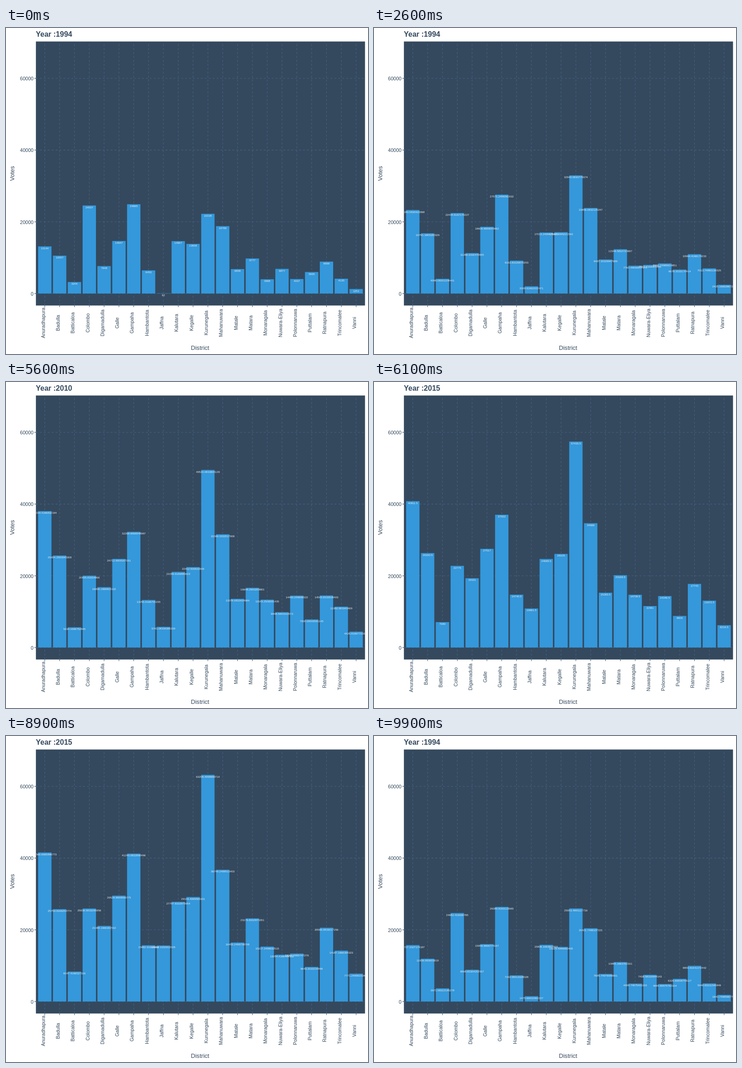
Recreate the animation shown at these times as an HTML page with a canvas. Size 789x710 px, loop 10 s.

```html
<!DOCTYPE html>
<html lang="en">
<head>
<meta charset="utf-8">
<title>Votes by district</title>
<style>
  html, body { margin: 0; width: 100%; height: 100%; overflow: hidden; background: #fff; }
  canvas { display: block; }
</style>
</head>
<body>
<canvas id="chart" width="789" height="710"></canvas>
<script>
const ctx = document.getElementById('chart').getContext('2d');
const SLATE = '#34495e', GRID = '#46627f', BLUE = '#3498db', PALE = '#ecf0f1';
const FONT = '"Liberation Sans", Arial, sans-serif';
const YEARS = [1994, 2010, 2015];
const DISTRICTS = [
  ['Anuradhapura', 13144, 37479, 44144],
  ['Badulla', 10557, 25519, 27142],
  ['Batticaloa', 3204, 5345, 8815],
  ['Colombo', 24557, 19488, 26062],
  ['Digamadulla', 7648, 16332, 22310],
  ['Galle', 14647, 24151, 30883],
  ['Gampaha', 24895, 31318, 42726],
  ['Hambantota', 6453, 12959, 16522],
  ['Jaffna', 62, 4737, 17026],
  ['Kalutara', 14607, 20382, 28997],
  ['Kegalle', 13838, 21674, 30536],
  ['Kurunegala', 22228, 47937, 66934],
  ['Mahanuwara', 18789, 30950, 38382],
  ['Matale', 6809, 13237, 17330],
  ['Matara', 9777, 15944, 24395],
  ['Monaragala', 3968, 13070, 16349],
  ['Nuwara-Eliya', 6877, 9506, 13616],
  ['Polonnaruwa', 4037, 14486, 14213],
  ['Puttalam', 5995, 7635, 9975],
  ['Ratnapura', 8899, 13856, 21630],
  ['Trincomalee', 4135, 11044, 15101],
  ['Vanni', 1251, 4069, 8364]
];

// The panel pads the data by 0.6 of a category and by 5 % of the value range.
const LEFT = 65.2, RIGHT = 782.5, TOP = 29.4, BOTTOM = 604.4;
const WIDTH = RIGHT - LEFT, HEIGHT = BOTTOM - TOP;
const UNIT = WIDTH / 22.2;
const xOf = i => LEFT + (i + 0.6) * UNIT;
const yOf = v => BOTTOM - HEIGHT * (0.05 + v / 66934) / 1.1;

// Each move takes 12 ticks of 100 ms, counted from these ticks.
const MOVE_STARTS = [21, 55, 88];
const MOVE_TICKS = 12;

function text(str, x, y, size, { align = 'center', color = SLATE, weight = '', turn = false } = {}) {
  ctx.save();
  ctx.translate(x, y);
  if (turn) ctx.rotate(-Math.PI / 2);
  ctx.font = `${weight} ${size}px ${FONT}`;
  ctx.textAlign = align;
  ctx.fillStyle = color;
  ctx.fillText(str, 0, 0);
  ctx.restore();
}

function line(x1, y1, x2, y2, color, dash = []) {
  ctx.strokeStyle = color;
  ctx.lineWidth = 1.07;
  ctx.setLineDash(dash);
  ctx.beginPath();
  ctx.moveTo(x1, y1);
  ctx.lineTo(x2, y2);
  ctx.stroke();
}

function drawAxes() {
  const dash = [4.28, 4.28], tick = 3.25;
  ctx.fillStyle = SLATE;
  ctx.fillRect(LEFT, TOP, WIDTH, HEIGHT);
  for (let v = 0; v <= 60000; v += 20000) {
    const y = yOf(v);
    line(LEFT, y, RIGHT, y, GRID, dash);
    line(LEFT - tick, y, LEFT, y, SLATE);
    text(v, 60, y + 4.6, 10.6, { align: 'right' });
  }
  DISTRICTS.forEach(([name], i) => {
    const x = xOf(i);
    line(x, BOTTOM, x, TOP, GRID, dash);
    line(x, BOTTOM, x, BOTTOM + tick, SLATE);
    text(name, x, 642.3, 10.5, { turn: true });
  });
  text('District', 423, 701, 13.1);
  text('Votes', 18, 316.7, 13, { turn: true });
}

function drawBars(values) {
  ctx.save();
  ctx.beginPath();
  ctx.rect(LEFT, TOP, WIDTH, HEIGHT);
  ctx.clip();
  ctx.fillStyle = BLUE;
  values.forEach((v, i) => {
    ctx.fillRect(xOf(i) - 0.45 * UNIT, yOf(v), 0.9 * UNIT, yOf(0) - yOf(v));
  });
  values.forEach((v, i) => {
    text(Number(v.toPrecision(15)), xOf(i), yOf(v) + 6.1, 6, { color: PALE });
  });
  ctx.restore();
}

function draw(now) {
  const tick = Math.floor((now % 10000) / 100);
  let from = 2;
  while (from > 0 && tick < MOVE_STARTS[from]) from--;
  const to = (from + 1) % 3;
  const step = Math.max(0, Math.min(MOVE_TICKS, tick - MOVE_STARTS[from]));
  // Single precision gives the labels their long decimals.
  const p = Math.fround(step / MOVE_TICKS);

  ctx.fillStyle = '#fff';
  ctx.fillRect(0, 0, 789, 710);
  text('Year :' + YEARS[step >= 6 ? to : from], 65, 19, 16, { align: 'left', weight: 'bold' });
  drawAxes();
  drawBars(DISTRICTS.map(([, ...v]) => v[from] + (v[to] - v[from]) * p));
}

const start = performance.now();
function loop() {
  draw(performance.now() - start);
  requestAnimationFrame(loop);
}
loop();
</script>
</body>
</html>
```
